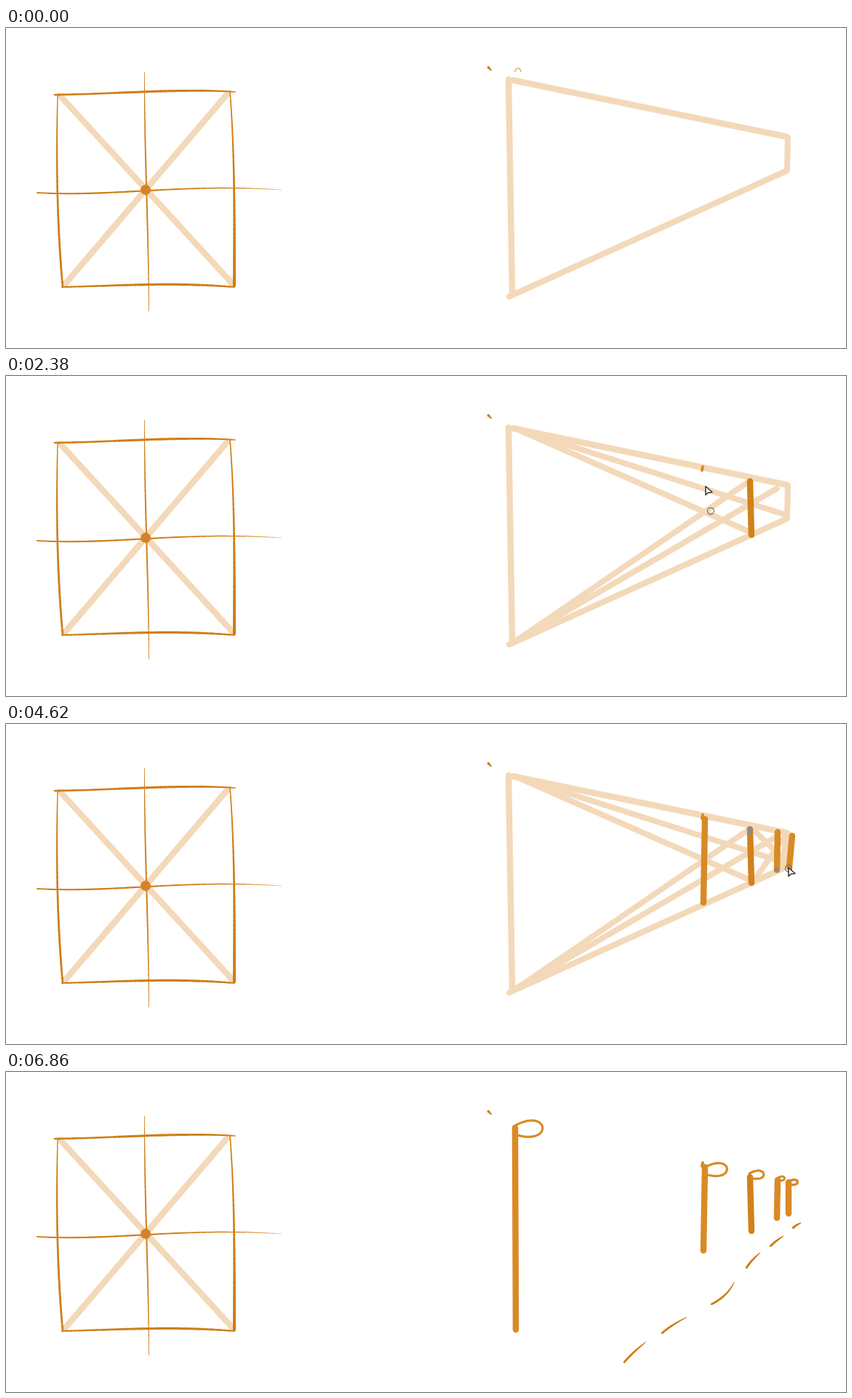
Animation, 1155 px wide and 441 px high, one loop 7.35 s. Source, as an HTML page with a canvas:

```html
<!DOCTYPE html>
<html lang="en">
<head>
<meta charset="utf-8">
<title>Perspective construction sketch</title>
<style>
html, body { margin: 0; width: 100%; height: 100%; overflow: hidden; background: #fff; }
canvas { display: block; }
</style>
</head>
<body>
<canvas id="stage" width="1155" height="441"></canvas>
<script>
const ctx = document.getElementById('stage').getContext('2d');
const LOOP = 7350, STEP = 70, GUIDES_HIDDEN = 6650;
const PALE = '#f3d9b9', ORANGE = '#d98a27', DEEP = '#d2811b', LINE = '#cf7e16', GREY = '#8d8d8d';

const mix = (a, b, p) => a.map((v, i) => v + (b[i] - v) * p);
const clamp = v => Math.max(0, Math.min(1, v));

// Bezier curve of any degree
function curve(points, p) {
  while (points.length > 1) points = points.slice(1).map((q, i) => mix(points[i], q, p));
  return points[0];
}

// Draws the first part of a curve; a list of widths makes a tapered line
function stroke(points, color, width, part = 1) {
  if (part <= 0) return;
  const n = points.length > 2 || Array.isArray(width) ? 40 : 1;
  ctx.strokeStyle = color;
  ctx.lineCap = ctx.lineJoin = 'round';
  if (Array.isArray(width)) {
    for (let i = 0; i < n; i++) {
      ctx.lineWidth = curve(width.map(w => [w]), (i + .5) / n)[0];
      ctx.beginPath();
      ctx.moveTo(...curve(points, part * i / n));
      ctx.lineTo(...curve(points, part * (i + 1) / n));
      ctx.stroke();
    }
    return;
  }
  ctx.lineWidth = width;
  ctx.beginPath();
  for (let i = 0; i <= n; i++) ctx.lineTo(...curve(points, part * i / n));
  ctx.stroke();
}

function dot(x, y, rx, ry, color) {
  ctx.fillStyle = color;
  ctx.beginPath();
  ctx.ellipse(x, y, rx, ry, 0, 0, 7);
  ctx.fill();
}

const actions = [];
const act = (start, end, points, style = {}) => actions.push({ start, end, points, ...style });
const move = (start, end, ...points) => act(start, end, points);
const guide = (start, end, ...points) =>
  act(start, end, points, { color: PALE, width: 8, until: GUIDES_HIDDEN });
const pole = (start, end, from, to, style) =>
  act(start, end, [from, to], { color: ORANGE, width: 8.5, ...style });
const flag = (start, end, x, y, size, width) =>
  act(start, end, [[0, 0], [48, -28], [56, 26], [5, 12]].map(([dx, dy]) => [x + dx * size, y + dy * size]),
    { color: ORANGE, width });

guide(70, 280, [700, 72], [1074, 192]);
guide(350, 630, [1060, 155], [697, 367]);
move(630, 700, [695, 367], [695, 368]);
move(840, 910, [664, 55], [640, 80]);
move(1120, 1260, [192, 223], [75, 238]);
pole(1470, 1680, [1023, 145], [1025, 219], { color: DEEP });
guide(1750, 1960, [700, 72], [1023, 215]);
guide(2030, 2240, [1022, 145], [697, 368]);
act(2310, 2330, [[958, 125], [957, 130]], { color: ORANGE, width: 4 });
move(2380, 2450, [962, 152], [969, 186]);
pole(2520, 2800, [961, 131], [959, 246]);
move(3150, 3220, [1022, 148], [1023, 147]);
guide(3290, 3430, [1029, 147], [1073, 190]);
move(3570, 3640, [1027, 217], [1027, 218]);
guide(3650, 3850, [1028, 216], [1073, 152]);
pole(4060, 4200, [1061, 149], [1060, 201]);
guide(4270, 4340, [1064, 199], [1076, 152]);
pole(4410, 4600, [1081, 154], [1077, 197], { until: 4900 });
move(4620, 4690, [1076, 198], [1076, 199]);
pole(4830, 4900, [1076, 152], [1076, 195]);
pole(4970, 5390, [700, 77], [701, 355]);
flag(5600, 5725, 698, 75, 1, 3.2);
move(5740, 5810, [695, 76], [703, 54]);
flag(5880, 5950, 960, 132, .79, 3.2);
flag(6000, 6060, 1022, 140, .5, 3.2);
flag(6090, 6125, 1061, 146, .24, 3);
flag(6150, 6200, 1076, 151, .31, 3.4);

[
  [[850, 400], [862, 386], [880, 372]],
  [[902, 360], [914, 349], [936, 338]],
  [[970, 320], [992, 309], [1001, 290]],
  [[1018, 270], [1025, 259], [1037, 249]],
  [[1051, 240], [1058, 233], [1069, 226]],
  [[1082, 215], [1086, 211], [1093, 208]]
].forEach((points, i) =>
  act(6230 + i * 62, 6275 + i * 62, points, { color: LINE, width: [2.4, 3, .8] }));
move(6700, 6800, [800, 160], [218, 90]);

// The pen follows every action and glides straight between them
function penAt(t) {
  const i = actions.findLastIndex(a => a.start <= t);
  if (i < 0) return actions[0].points[0];
  const { start, end, points } = actions[i], next = actions[i + 1];
  if (t <= end || !next) return curve(points, clamp((t - start) / (end - start)));
  return mix(points.at(-1), next.points[0], (t - end) / (next.start - end));
}

function drawSquare() {
  stroke([[75, 94], [311, 352]], PALE, 8.5);
  stroke([[305, 90], [82, 352]], PALE, 8.5);
  stroke([[67, 92], [150, 91], [240, 83], [315, 88]], LINE, [2.6, 2, 4.6, 1.5]);
  stroke([[71, 92], [69, 180], [70, 270], [78, 357]], LINE, [1.2, 2.5, 3, 2.6]);
  stroke([[308, 87], [315, 180], [314, 270], [314, 355]], LINE, [1.5, 2, 3.5, 4.2]);
  stroke([[77, 357], [160, 355], [230, 350], [314, 357]], LINE, [2, 2.5, 4.5, 2]);
  stroke([[190.5, 61], [190, 170], [196, 270], [196.5, 390]], LINE, [.7, 2.4, 2.4, .7]);
  stroke([[43, 227], [150, 233], [240, 214], [378, 223]], LINE, [1.8, 2.4, 2.4, .4]);
  dot(192, 223, 7, 7, '#d3842a');
}

function drawTrapezoid() {
  stroke([[691, 71], [696, 364]], PALE, 8.5);
  stroke([[697, 72], [1074, 150]], PALE, 8.5);
  stroke([[1075, 151], [1074, 195]], PALE, 8);
  stroke([[692, 370], [1073, 197]], PALE, 8.5);
}

function drawPen(t) {
  const [cx, cy] = penAt(t + STEP);
  ctx.lineWidth = 1.3;
  ctx.strokeStyle = '#777';
  ctx.beginPath();
  ctx.arc(cx, cy, 4.5, 0, 7);
  ctx.stroke();
  const [x, y] = penAt(t);
  ctx.beginPath();
  [[0, 0], [0, 12], [3, 9], [9, 8]].forEach(([dx, dy]) => ctx.lineTo(x + dx, y + dy));
  ctx.closePath();
  ctx.fillStyle = '#fff';
  ctx.strokeStyle = '#333';
  ctx.lineWidth = 1.5;
  ctx.fill();
  ctx.stroke();
}

function draw(time) {
  const t = Math.floor(time % LOOP / STEP) * STEP;
  ctx.fillStyle = '#fff';
  ctx.fillRect(0, 0, 1155, 441);
  drawSquare();
  stroke([[663, 54], [667.5, 58.5]], LINE, [2.8, .8]);

  const visible = actions.filter(a => a.color && t >= a.start && t < (a.until ?? Infinity));
  const paint = a => stroke(a.points, a.color, a.width, clamp((t - a.start) / (a.end - a.start)));
  if (t < GUIDES_HIDDEN) drawTrapezoid();
  visible.filter(a => a.color === PALE).forEach(paint);
  visible.filter(a => a.color !== PALE).forEach(paint);

  if (t >= 3150 && t < 6020) dot(1023, 147, 3.5, 6, GREY);
  if (t >= 4200 && t < 6090) dot(1060, 201, 3.5, 4, '#a58a68');

  if (t < STEP) stroke([[700, 60], [701, 54], [707, 54], [708, 60]], '#d6a06c', 1.3);
  else if (t < 6860) drawPen(t);
}

function tick() {
  draw(performance.now());
  requestAnimationFrame(tick);
}
tick();
</script>
</body>
</html>
```
